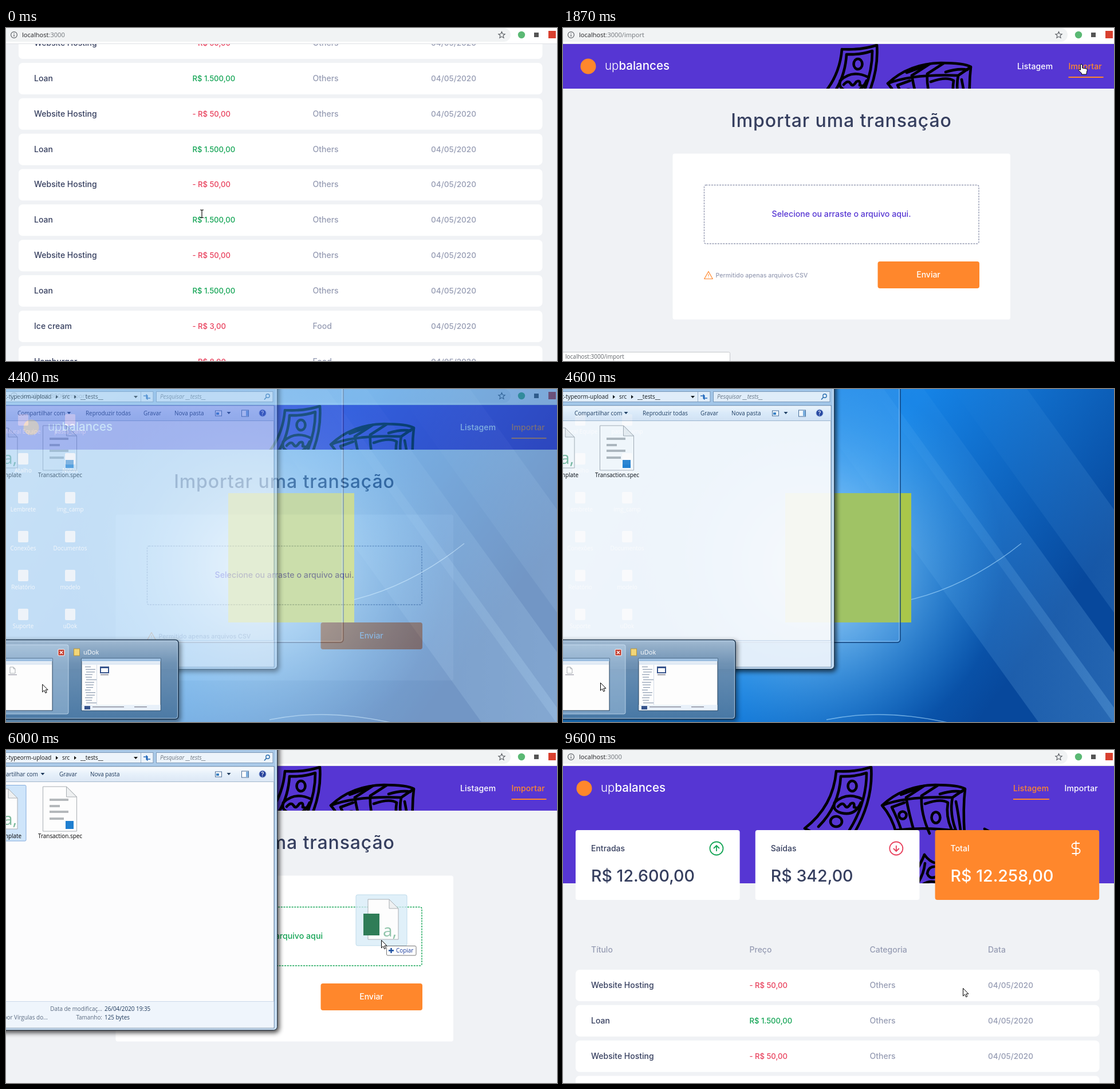
Animation, 962 px wide and 582 px high, one loop 9670 ms. Source, as an HTML page:

```html
<!DOCTYPE html>
<html lang="pt">
<head>
<meta charset="utf-8">
<title>Transações</title>
<style>
html, body { margin: 0; width: 100%; height: 100%; overflow: hidden; background: #f0f2f5; }
svg { display: block; width: 962px; height: 582px; font: 500 14px Inter, sans-serif; }
.ui { font-family: "Open Sans", "Noto Sans", sans-serif; font-weight: 400; font-size: 9.9px; }
.art { fill: none; stroke: #000; stroke-width: 4.6; stroke-linecap: round; stroke-linejoin: round; }
</style>
</head>
<body>
<svg id="stage" viewBox="0 0 962 582"></svg>
<script>
const LOOP = 9670, STEP = 200 / 3;
const C = { purple: '#5636d3', bg: '#f0f2f5', orange: '#ff872c', ink: '#363f5f',
  gray: '#969cb3', green: '#12a454', red: '#e83f5b' };

const rect = (x, y, w, h, fill, more = '') =>
  `<rect x="${x}" y="${y}" width="${w}" height="${h}" fill="${fill}" ${more}/>`;
const text = (x, y, s, fill, size = 14, more = '') =>
  `<text x="${x}" y="${y}" fill="${fill}" style="font-size:${size}px" ${more}>${s}</text>`;
const ui = (x, y, s, fill = '#1e395b', more = '') => text(x, y, s, fill, 9.9, 'class="ui" ' + more);
const path = (d, stroke, w = 1, fill = 'none', more = '') =>
  `<path d="${d}" stroke="${stroke}" stroke-width="${w}" fill="${fill}" ${more}/>`;
const group = (id, body, more = '') => `<g id="${id}" ${more}>${body}</g>`;
const tri = (x, y, fill = '#1e395b') => path(`M${x - 3.5},${y - 2}h7l-3.5,4z`, 'none', 0, fill);

const defs = `<defs>
<clipPath id="view"><rect y="27.5" width="962" height="555"/></clipPath>
<clipPath id="tall"><rect x="-20" y="27" width="1000" height="206"/></clipPath>
<clipPath id="low"><rect y="27" width="962" height="79"/></clipPath>
<linearGradient id="bar" x2="0" y2="1"><stop stop-color="#f8fbfe"/><stop offset=".5" stop-color="#e6f0fa"/><stop offset="1" stop-color="#dce7f4"/></linearGradient>
<linearGradient id="glass" x2="0" y2="1"><stop stop-color="#a9c9e8"/><stop offset="1" stop-color="#c3dcf3"/></linearGradient>
<linearGradient id="pop" x2="0" y2="1"><stop stop-color="#a3bdd6"/><stop offset=".3" stop-color="#6e93b7"/><stop offset="1" stop-color="#4d7ca8"/></linearGradient>
<linearGradient id="sky" x2="1" y2=".45"><stop stop-color="#3fa0ee"/><stop offset=".55" stop-color="#1583e6"/><stop offset="1" stop-color="#07489c"/></linearGradient>
<radialGradient id="glow" gradientUnits="userSpaceOnUse" cx="440" cy="310" r="330"><stop stop-color="#e8f8ff" stop-opacity=".85"/><stop offset="1" stop-color="#4ab6f8" stop-opacity="0"/></radialGradient>
<linearGradient id="beam" x2="1" y2="0"><stop stop-color="#8fd0ff" stop-opacity="0"/><stop offset="1" stop-color="#8fd0ff" stop-opacity=".25"/></linearGradient>
<filter id="soft" x="-20%" y="-20%" width="140%" height="140%"><feGaussianBlur stdDeviation="4"/></filter>
</defs>`;

// Banknotes behind the page header
const notes = `<g class="art">
<path d="M487,37Q520,39 548,30Q552,88 518,146M487,37Q482,98 432,137L450,146M495,46Q520,47 540,40Q540,92 510,140M495,46Q492,98 456,134"/>
<ellipse cx="515" cy="63" rx="7.5" ry="9"/>
<path d="M484,92Q505,72 533,86M484,92Q480,106 496,110Q520,116 530,92M490,99q8,-9 12,-2t10,-3q8,-4 6,6l8,2"/>
<ellipse cx="487" cy="125" rx="10" ry="9"/>
<path d="M567,97Q604,62 660,61Q700,61 712,68Q708,102 711,146M567,97Q584,116 592,146M567,97Q610,80 690,83L712,68M690,83Q684,112 698,146"/>
<path d="M609,83Q614,112 624,146M609,83L640,63M636,80Q634,110 650,146M636,80L664,62M584,100L606,92M584,100Q594,120 600,138M642,94Q670,84 682,92Q678,116 688,138"/>
<path d="M600,78L630,67M668,77Q690,70 706,73M696,90Q700,110 704,140"/>
<circle cx="603" cy="114" r="6.5"/><ellipse cx="661" cy="118" rx="7.5" ry="9.5"/>
<path d="M592,140Q640,134 696,141M746,138l8,4M641,183Q634,200 626,212M641,183Q650,196 662,198M630,232Q640,216 642,198M646,216q2,-14 16,-12M646,216q4,10 14,6M634,238Q648,226 664,232"/>
</g>`;

function header(tab, clip, artX) {
  const item = (x, s, on, w) => text(x, 72, s, on ? C.orange : '#fff', 14, 'letter-spacing=".15"') +
    (on ? rect(x, 85, w, 2, C.orange) : '');
  return rect(-20, 27, 1010, clip === 'low' ? 79 : 206, C.purple) +
    `<g clip-path="url(#${clip})"><g transform="translate(${artX})">${notes}</g></g>` +
    `<circle cx="44" cy="67" r="13.5" fill="${C.orange}"/>` +
    text(73, 73, '<tspan font-weight="300">up</tspan>balances', '#fff', 20.5) +
    item(793, 'Listagem', tab === 0, 63) + item(882.5, 'Importar', tab === 1, 61);
}

function card(x, label, value, kind) {
  const total = kind === 'total', ink = total ? '#fff' : C.ink;
  const color = kind === 'in' ? C.green : C.red;
  const icon = total
    ? path('M0,-13V13M6.5,-9H-2.5a4.5,4.5 0 0 0 0,9h5a4.5,4.5 0 0 1 0,9H-7', '#fff', 1.8)
    : `<circle r="11.5" fill="none" stroke="${color}" stroke-width="1.8"/>` +
      path('M0,5V-5M-5,0L0,-5L5,0', color, 1.8, 'none', kind === 'in' ? '' : 'transform="rotate(180)"');
  return rect(x, 140, 286.6, 122, total ? C.orange : '#fff', 'rx="4"') +
    text(x + 27, 177, label, ink) + text(x + 27, 230, value, ink, 28.6) +
    `<g transform="translate(${x + 246},172)">${icon}</g>`;
}

const pair = [['Website Hosting', '- R$ 50,00', 'Others'], ['Loan', 'R$ 1.500,00', 'Others']];
const items = [...Array.from({ length: 10 }, (_, i) => pair[i % 2]),
  ['Ice cream', '- R$ 3,00', 'Food'], ['Hamburger', '- R$ 8,00', 'Food'], pair[1]];

function home(id, values, cols, list) {
  const dx = list.length ? -7 : 0;
  const heads = ['Título', 'Preço', 'Categoria', 'Data'].map((s, i) => text(cols[i], 354, s, C.gray)).join('');
  const rows = list.map(([name, price, kind], i) => {
    const y = 384 + i * 61.85, b = y + 32;
    return rect(22, y, 914.5, 55, '#fff', 'rx="7"') + text(cols[0], b, name, C.ink) +
      text(cols[1], b, price, price[0] === '-' ? C.red : C.green, 13.1) +
      text(cols[2], b, kind, C.gray) + text(cols[3], b, '04/05/2020', C.gray, 13.6);
  }).join('');
  return group(id, rect(0, 0, 962, 1300, C.bg) +
    `<g transform="translate(${dx})">${header(0, 'tall', dx && -3)}` +
    card(29, 'Entradas', values[0], 'in') + card(342.8, 'Saídas', values[1], 'out') +
    card(656.6, 'Total', values[2], 'total') + '</g>' + heads + rows);
}

const wide = [49, 325.5, 535.5, 742];
const importPage = group('imp', rect(0, 0, 962, 582, C.bg) + header(1, 'low', 0) +
  text(486, 173, 'Importar uma transação', C.ink, 32, 'text-anchor="middle" letter-spacing=".9"') +
  rect(191.5, 219.5, 589.5, 290, '#fff', 'rx="4" id="panel"') +
  rect(246.5, 274.5, 479.5, 102.5, 'none', `rx="3" id="zone" stroke="${C.gray}" stroke-width="1.4" stroke-dasharray="3 1.7"`) +
  text(486, 330, '', C.purple, 14.2, 'id="hint" text-anchor="middle"') +
  group('file', text(246, 413, 'import_template.csv', C.ink) + text(246, 430, '125 B', C.gray, 10.7)) +
  group('foot', path('M254,425.5L261.3,438.5H246.7Z', C.orange, 1.2, 'none', 'stroke-linejoin="round"') +
    path('M254,430v4M254,435.6v1', C.orange) +
    text(266.5, 435.5, 'Permitido apenas arquivos CSV', C.gray, 10.7) +
    rect(549.5, 408, 177.5, 47, C.orange, 'rx="4" id="send"') +
    text(638, 436, 'Enviar', '#fff', 14, 'text-anchor="middle"')));

const browser = rect(0, 0, 962, 28, '#fff') + rect(-20, 0, 901, 24, '#f1f3f4', 'rx="12"') +
  '<circle cx="14" cy="12" r="5.4" fill="none" stroke="#5f6368" stroke-width="1.2"/>' +
  path('M14,11.3v3.6M14,8.8v1.3', '#5f6368', 1.3) +
  text(28, 16, 'localhost<tspan fill="#70757a">:3000<tspan id="route"></tspan></tspan>', '#202124', 11.1, 'class="ui"') +
  path('M865.5,6.6l1.6,3.7 4,.4-3,2.6.9,3.9-3.5-2.1-3.5,2.1.9-3.9-3-2.6 4-.4z', '#5f6368', 1.2) +
  '<circle cx="900" cy="12" r="6.2" fill="#5bb974"/>' + rect(922, 8, 8, 8, '#555') +
  rect(947, 5, 13, 13, '#d8402f') + rect(0, 27, 962, 1, '#dfe1e5');

const bubble = group('bubble', rect(-3, 566.5, 294.5, 22, '#fff', 'rx="2" stroke="#c4c7cb"') +
  text(4, 578, 'localhost:3000/import', '#5f6368', 10, 'class="ui" id="link"'));

const page = (x, y, w, h, fold) =>
  path(`M${x},${y}h${w - fold}l${fold},${fold}v${h - fold}h${-w}z`, '#a8adb2', 1, '#fdfdfd') +
  path(`M${x + w - fold},${y}v${fold}h${fold}z`, '#a8adb2', 1, '#eef0f1');

const labels = ['Mural Equipe', 'pasta_camp', 'Atalho', 'Notas', 'Lembrete', 'img_camp',
  'Conexões', 'Documentos', 'Relatório', 'modelo', 'Suporte', 'uDok'];
const desktop = group('desk', rect(0, 0, 962, 582, 'url(#sky)') +
  [[560, 150], [690, 90], [830, 130]].map(([x, w]) =>
    path(`M${x - 150},0h${w}l420,582h${-w}z`, 'none', 0, 'url(#beam)')).join('') +
  rect(0, 0, 962, 582, 'url(#glow)') +
  path('M590,372Q700,350 800,270M460,578Q570,555 700,590', '#a9dcff', 1.5, 'none', 'opacity=".6"') +
  rect(388, 182, 220, 226, '#a9c64a') +
  labels.map((s, i) => {
    const x = i % 2 ? 112 : 30, y = 52 + (i >> 1) * 68;
    return rect(x - 9, y - 8, 18, 20, '#e8eef5', 'rx="2"') + ui(x, y + 26, s, '#fff', 'text-anchor="middle"');
  }).join('') +
  rect(-10, -10, 599, 453, '#6fb4f0', 'rx="5" fill-opacity=".16" stroke="#0f3f78" stroke-width="1.4"') +
  rect(-10, -10, 597, 451, 'none', 'rx="4" stroke="#a8d6ff" stroke-opacity=".7"'));

const explorer = group('exp',
  rect(-20, -20, 497, 514, '#000', 'rx="7" opacity=".75" filter="url(#soft)"') +
  rect(-20, -20, 493.5, 509.5, 'url(#glass)', 'rx="6" stroke="#2b3a4c"') +
  rect(-20, -20, 491.5, 507.5, 'none', 'rx="5" stroke="#e4f2ff"') +
  rect(-5, 4.5, 262, 18, '#edf4fb', 'stroke="#7c97b5"') + path('M235.5,5v17', '#9db3cb') +
  ui(-2, 17, 't-typeorm-upload', '#111') + ui(98, 17, 'src', '#111') + ui(130, 17, '__tests__', '#111') +
  path('M87,10.5l4,3.3-4,3.3zM119,10.5l4,3.3-4,3.3z', 'none', 0, '#111') + tri(226.5, 14, '#111') +
  path('M240,12h7m-2.5,-2.5l2.5,2.5-2.5,2.5M252,16h-7m2.5,-2.5l-2.5,2.5 2.5,2.5', '#1d63b8', 1.5) +
  rect(262.5, 4.5, 203.5, 18, '#edf4fb', 'stroke="#7c97b5"') +
  ui(269, 17, 'Pesquisar __tests__', '#6d7782', 'font-style="italic"') +
  '<circle cx="457" cy="12" r="3.2" fill="none" stroke="#2f6fae" stroke-width="1.4"/>' + path('M454.5,14.5l-3.5,4', '#2f6fae', 1.6) +
  rect(-5, 29, 473, 457, '#fcfcfd', 'stroke="#54708f"') +
  rect(-5, 29.5, 472.5, 26, 'url(#bar)') + path('M-5,55.5h472.5', '#a4b8cd') +
  group('barA', ui(20, 46, 'Compartilhar com') + tri(110, 42) + ui(139, 46, 'Reproduzir todas') +
    ui(240, 46, 'Gravar') + ui(294, 46, 'Nova pasta')) +
  group('barB', ui(56, 46, 'Compartilhar com', '#1e395b', 'text-anchor="end"') + tri(64, 42) +
    ui(93, 46, 'Gravar') + ui(147, 46, 'Nova pasta')) +
  rect(365.5, 38, 11, 9, '#fff', 'stroke="#4a6d96"') + rect(367, 41, 5, 4, '#3b82c4') + tri(389, 42) +
  rect(411.5, 37, 12, 11, '#fff', 'stroke="#4a6d96"') + rect(419, 38, 4, 9, '#7fb0de') +
  '<circle cx="448" cy="42" r="6" fill="#27439c" stroke="#8fa6d8"/>' + text(448, 46, '?', '#fff', 10, 'text-anchor="middle"') +
  rect(-5, 61.5, 40, 97.5, '#cfe5fa', 'id="pick" rx="2" stroke="#84acdd"') +
  page(-35, 68, 55, 70, 16) + text(-5, 131, 'a,', '#7dba9d', 30, 'class="ui"') +
  ui(27, 154, 'import_template', '#000', 'text-anchor="end"') +
  page(64.5, 64, 59, 78, 18) +
  [[85, 33], [96, 18], [106, 33], [118, 25]].map(([y, w]) => rect(76, y, w, 4, '#b4b8bb')).join('') +
  rect(104, 124, 14, 14, '#1f7fd0') + ui(94.5, 154, 'Transaction.spec', '#000', 'text-anchor="middle"') +
  rect(-5, 440, 472.5, 45.5, '#eff5fc') + path('M-5,439.5h472.5', '#ccd9ea') +
  group('info', ui(168, 456, 'Data de modificaç...', '#5a6a80', 'text-anchor="end"') + ui(172, 456, '26/04/2020 19:35') +
    ui(73, 471, 'Separado por Vírgulas do...', '#5a6a80', 'text-anchor="end"') +
    ui(168, 471, 'Tamanho:', '#5a6a80', 'text-anchor="end"') + ui(172, 471, '125 bytes')));

const thumb = x => rect(x, 471, 138, 91, '#fdfdfd', 'stroke="#27425f"') + rect(x, 471, 138, 5, '#9fc1e2') +
  rect(x + 1, 477, 136, 5, '#e0eaf5');
const popup = group('pop', rect(-20, 440, 325, 142, '#000', 'rx="6" opacity=".45" filter="url(#soft)"') +
  rect(-20, 438.5, 321, 138.5, 'url(#pop)', 'rx="5" fill-opacity=".93" stroke="#1d3650" stroke-width="1.5"') +
  rect(-20, 440, 319.5, 135.5, 'none', 'rx="4" stroke="#c5dcf0" stroke-opacity=".7"') +
  rect(-10, 447, 119, 121, '#cfe6fa', 'rx="3" fill-opacity=".35" stroke="#d5e9fa" stroke-opacity=".7"') +
  rect(91, 455, 11, 11, '#c23a2c', 'rx="1" stroke="#fff"') + path('M94,458l5,5m0,-5l-5,5', '#fff', 1.5) +
  thumb(-57) + page(7, 486, 9, 11, 3) + rect(4, 499, 15, 1, '#889') +
  thumb(132) + rect(118.5, 454, 10, 12, '#f3d678', 'stroke="#b8963a"') + text(135, 464, 'uDok', '#fff', 11, 'class="ui"') +
  rect(164, 485, 16, 12, '#36538c') + rect(166, 488, 12, 7, '#fff') + rect(165, 499, 14, 1, '#556') +
  Array.from({ length: 15 }, (_, i) => rect(138 + i % 3, 485 + i * 4.5, 10 + i * 7 % 9, 1.2, '#8c9bb0')).join('') +
  path('M158.5,482v70', '#d4dde8') + rect(132.5, 552, 137, 9.5, '#e9f1fa') + rect(137, 554, 10, 6, '#36538c') +
  rect(151, 555, 55, 1.2, '#778') + rect(224, 555, 22, 1.2, '#778'));

const ghost = group('ghost', rect(-44, -79, 89, 89, '#d6ebf7', 'rx="3" opacity=".75" stroke="#a9cfe4"') +
  page(-23, -71, 53, 70, 16) + text(3, -6, 'a,', '#8fc4aa', 30, 'class="ui"') +
  rect(-31, -46, 28, 38, '#2f7d57') +
  group('copy', rect(9.5, 10.5, 51.5, 16.5, '#fff', 'rx="2" stroke="#767676"') +
    path('M13,18.5h9M17.5,14v9', '#1c4fa0', 2.4) + ui(26, 22, 'Copiar', '#1a3c9c')));

const pointer = group('cur',
  group('arrow', path('M.5,.5V14L3.6,11L5.7,15.7L7.9,14.7L5.9,10.2H10Z', '#000', 1, '#fff')) +
  group('beamCur', path('M-3,-7h2.2l.8,.8.8,-.8H3M0,-6V5.5M-3,6.5h2.2l.8,-.8.8,.8H3', '#000', 1.1)) +
  group('hand', path('M-1.5,9V1a1.6,1.6 0 0 1 3.2,0V6l7,1.2q1.8,.6 1.6,2.6L9,14.5V17H.5V15L-5,9.8q0,-2.4 3.5,-.4z', '#000', 1, '#fff')));

document.getElementById('stage').innerHTML = defs +
  `<g clip-path="url(#view)">` +
  home('homeA', ['R$ 11.100,00', 'R$ 289,00', 'R$ 10.811,00'], wide, items) +
  home('homeN', ['R$ NaN', 'R$ NaN', 'R$ NaN'], [56, 267, 481, 766], []) +
  home('homeB', ['R$ 12.600,00', 'R$ 342,00', 'R$ 12.258,00'], wide, items.slice(0, 4)) +
  importPage + '</g>' + browser + bubble + desktop + explorer + popup + ghost + pointer;

const el = {};
document.querySelectorAll('#stage [id]').forEach(n => el[n.id] = n);
const set = (id, name, v) => el[id].setAttribute(name, v);
const show = (id, on) => set(id, 'display', on ? 'inline' : 'none');
const move = (id, x, y) => set(id, 'transform', `translate(${x.toFixed(2)},${y.toFixed(2)})`);
const ramp = (t, a, b) => Math.min(1, Math.max(0, (t - a) / (b - a)));

function track(keys, t) {
  let i = 0;
  while (i < keys.length - 2 && t >= keys[i + 1][0]) i++;
  const [a, ...p] = keys[i], [b, ...q] = keys[i + 1];
  const k = ramp(t, a, b), s = k * k * (3 - 2 * k);
  return p.map((v, j) => v + (q[j] - v) * s);
}

const scrollKeys = [[190, 508.6], [933, 85], [1133, 0]];
const cursorKeys = [[190, 342, 325], [930, 842, 146], [1140, 850, 128], [1700, 905, 64], [2190, 905, 64],
  [3133, 12, 556], [3200, 0, 566], [3260, -15, 588], [3640, 24, 590], [4000, 26, 570], [4460, 65, 513],
  [4760, 65, 513], [5300, 6, 104], [5600, 6, 104], [5960, 655, 332], [6320, 655, 332], [6530, 822, 370],
  [6720, 822, 370], [7070, 258, 412], [7460, 690, 486], [7730, 690, 486], [8060, 849, 373],
  [8580, 849, 373], [9590, 698, 416]];

function draw(t) {
  const within = (a, b) => t >= a && t < b;
  const [x, y] = track(cursorKeys, t);
  const over = within(5850, 6380), dropped = t >= 6380, picked = t >= 5330;
  const onImport = within(1790, 7660), peek = ramp(t, 4250, 4530) * (1 - ramp(t, 4740, 4940));

  show('homeA', t < 1790);
  show('imp', onImport);
  show('homeN', within(7660, 7980));
  show('homeB', t >= 7980);
  move('homeA', 0, -track(scrollKeys, t)[0]);
  el.route.textContent = onImport ? '/import' : '';
  show('bubble', within(1590, 2480) || within(7700, 7930));
  show('link', t < 3000);

  set('zone', 'stroke', over ? C.green : C.gray);
  set('hint', 'fill', over ? C.green : C.purple);
  el.hint.textContent = over ? 'Solte o arquivo aqui' : 'Selecione ou arraste o arquivo aqui.';
  show('file', dropped);
  move('foot', 0, dropped ? 58 : 0);
  set('panel', 'height', dropped ? 348 : 290);
  const sending = within(7260, 7660);
  set('send', 'fill', sending ? '#e77a28' : C.orange);

  show('desk', peek > 0);
  set('desk', 'opacity', peek);
  show('exp', within(4250, 6400));
  set('exp', 'opacity', t < 4740 ? .93 * ramp(t, 4250, 4530) : .93 + .07 * ramp(t, 4740, 4870));
  show('pop', within(3860, 4880));
  set('pop', 'opacity', ramp(t, 3800, 3990) * (1 - ramp(t, 4740, 4900)));
  show('barA', !picked);
  show('barB', picked);
  show('pick', picked);
  show('info', picked);

  show('ghost', within(5620, 6330));
  show('copy', over);
  move('ghost', x, y);
  const hand = within(1590, 2280) || sending;
  show('beamCur', t < 330);
  show('hand', hand);
  show('arrow', t >= 330 && !hand);
  move('cur', x, y);
}

const start = performance.now();
function tick() {
  const t = (performance.now() - start) % LOOP;
  draw(Math.floor((t + 4) / STEP) * STEP);
  requestAnimationFrame(tick);
}
tick();
</script>
</body>
</html>
```
